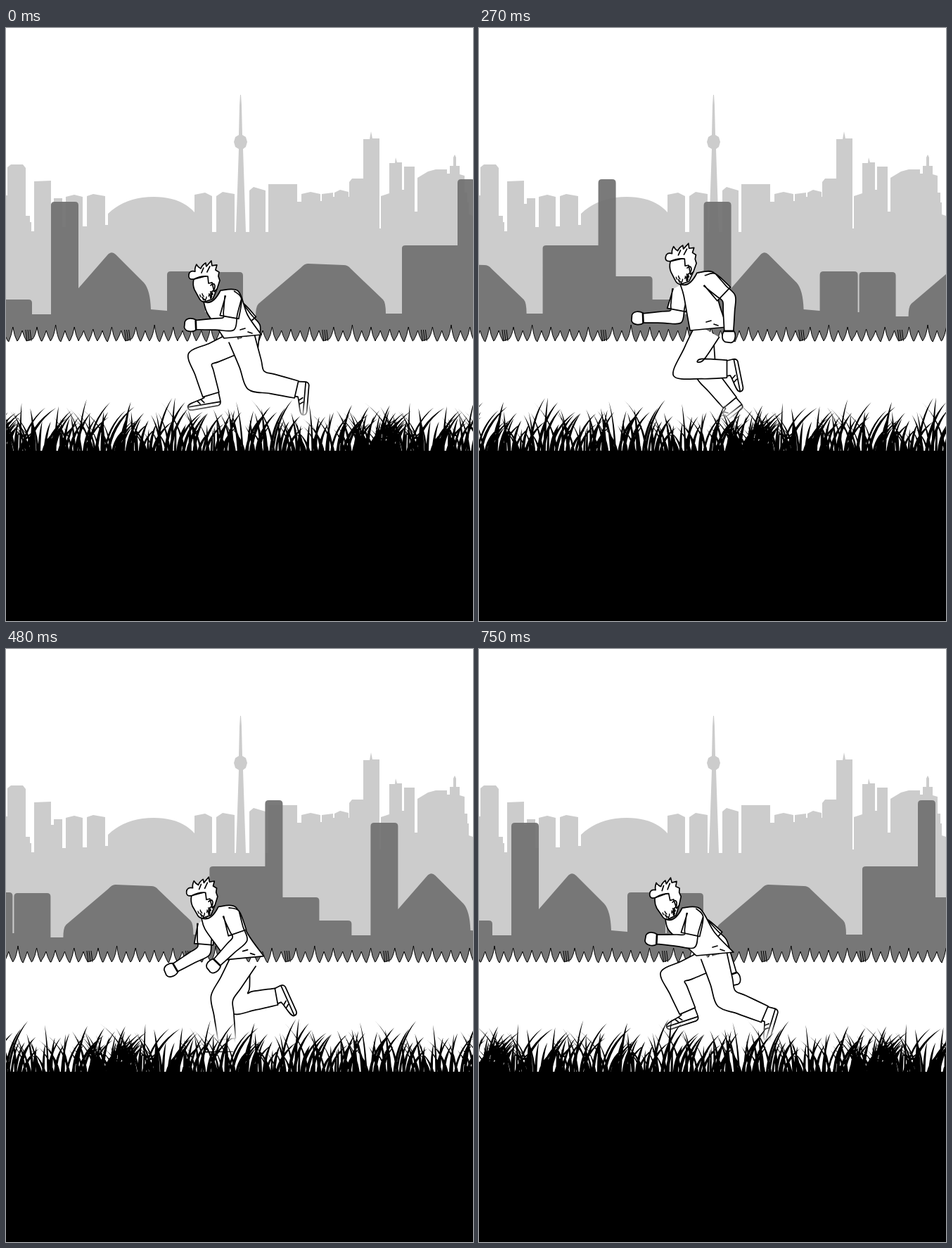
Recreate the animation shown at these times as an HTML page. Size 664 by 843 pixels, loop 780 ms.

```html
<!DOCTYPE html>
<html lang="en">
<head>
<meta charset="utf-8">
<title>Runner</title>
<style>
html, body { margin: 0; width: 100%; height: 100%; overflow: hidden; background: #fff; }
svg { display: block; width: 100%; height: 100%; }
.ink { fill: #fff; stroke: #000; stroke-width: 1.7; stroke-linejoin: round; stroke-linecap: round; }
.line { fill: none; }
</style>
</head>
<body>
<svg viewBox="0 0 664 843">
  <defs>
    <linearGradient id="fade" x1="0" y1="0" x2="0" y2="1">
      <stop offset="0" stop-color="#fff" stop-opacity="0"/>
      <stop offset=".7" stop-color="#fff"/>
    </linearGradient>
    <path id="town" d="M64 447V252Q64 247 69 247H98Q103 247 103 252V370L144 323Q150 316 156 322L196 362Q205 372 206 400L229 402V351Q229 346 234 346H278Q283 346 283 351V404H285V352Q285 347 290 347H332Q337 347 337 352V410H355Q355 396 359 392L419 341Q425 334 430 335L480 337Q486 337 490 342L536 386Q540 390 540 406H563V313Q563 309 568 309H642V220Q642 215 647 215H662Q667 215 667 220V353H714Q719 353 719 358V386H760Q765 386 765 391V407H793V447Z"/>
    <path id="blades"/>
  </defs>
  <path fill="#ccc" d="M0 447V238H2V198L7 194H24L28 199V267H34V276H36V289H40V218L64 217V250H68V242H80V283H85V240L97 237L109 240V282H115V239L124 236L141 239V280H145V264Q170 240 210 240Q248 240 268 262V237L283 234L293 239V290H299V239L308 233L325 236V290H327L331 172L326 169L324 162L326 155L331 152L332 110L333 95H334L335 110L336 152L341 155L343 162L341 169L337 172L341 290H346V231L352 226L369 231V290H373V222H414V247H420V236L433 233L447 236V246H449V236L465 234V240H467V234L475 230L487 233V240H488V219L492 214H508V158H517L519 147L521 157H531V285H533V239L545 235V192H553L554 184L556 191H563V230H566V197H581V261H585V213L600 204L611 201H627V207H631V196H636V184L638 180L640 184V196H645V208L652 210V234H656V248H658V265L664 267V447Z"/>
  <g id="mid" fill="#717171" opacity=".93"></g>
  <g id="hedge" stroke="#000">
    <path id="spikes" fill="#fff"/>
    <path id="stalks" fill="none"/>
  </g>
  <g class="ink">
    <path id="armB"/>
    <path id="shoeB" class="shoe"/><path id="legB"/>
    <path id="shoeA" class="shoe"/><path id="legA"/>
    <path id="torso"/>
    <g id="head">
      <path d="M-16-8Q-18 0-15 7L-9 18Q-6 25 0 24L11 20L17 6L8-14Z"/>
      <path d="M-16-8Q-24-7-23-14Q-22-21-14-19Q-15-23-12-29Q-10-25-6-23Q-4-28 1-31L2-26L9-34L10-27L17-28L15-21L20-18L19-12L21-6L17 6L13 10L10-3L5-2L4-12Q-6-13-16-8Z"/>
      <path class="line" d="M-2-24L-5-17M7-26L3-18M8 1Q13-4 14 2Q14 8 9 10"/>
      <path class="line" id="beard" stroke-width="1.4"/>
    </g>
    <path id="armA"/>
  </g>
  <rect y="532" width="664" height="40" fill="url(#fade)"/>
  <g id="lawn"></g>
  <rect y="601" width="664" height="242"/>
</svg>
<script>
const $ = id => document.getElementById(id);
const FRAME = 30, COUNT = 26, HALF = COUNT / 2;
const TOWN = 728, SPIKE = 140.6, LAWN = 552;

// Stride keys: step, upper angle, lower angle (degrees from straight down, + is backwards).
// Both sides of the body share them, half a cycle apart.
const legKeys = [[0, 19, 77], [4, -4, 108], [6.5, -20, 115], [9, -30, 90], [11, -64, 30],
  [14, -66, 10], [17, -12, 5], [20, -3, 22], [23, 11, 48]];
const armKeys = [[0, -10, -88], [4, -3, -50], [9, 46, 0], [12, 48, 20], [14, 36, -26], [19, -6, -72], [24, -14, -98]];
// Body keys: step, hip x, hip y, head x, head y
const bodyKeys = [[0, 335, 441, 283, 365], [4, 327, 432, 289, 342], [9, 325, 430, 288, 340],
  [14, 345, 448, 278, 366], [19, 329, 432, 283, 347], [23, 318, 426, 257, 351], [25, 334, 436, 267, 360]];

function sample(keys, step) {
  const p = step % COUNT;
  let i = keys.length - 1;
  while (keys[i][0] > p) i--;
  const a = keys[i], b = keys[(i + 1) % keys.length];
  const k = (p - a[0]) / ((b[0] || COUNT) - a[0]);
  return a.slice(1).map((v, j) => v + (b[j + 1] - v) * k);
}

const add = (a, b, k = 1) => [a[0] + b[0] * k, a[1] + b[1] * k];
const mix = (a, b, k = .5) => [a[0] + (b[0] - a[0]) * k, a[1] + (b[1] - a[1]) * k];
const rad = deg => deg * Math.PI / 180;
const along = deg => [Math.sin(rad(deg)), Math.cos(rad(deg))];
const front = deg => [-Math.cos(rad(deg)), Math.sin(rad(deg))];
const fmt = v => +v.toFixed(1);
const pt = p => p.map(fmt).join(" ");

// Smooth curve through the points, starting at the pen position
function curve(p) {
  let d = "";
  for (let i = 0; i < p.length - 1; i++) {
    const b = p[i], c = p[i + 1], a = p[i - 1] || b, e = p[i + 2] || c;
    d += `C${pt(add(b, add(c, a, -1), 1 / 6))} ${pt(add(c, add(e, b, -1), -1 / 6))} ${pt(c)}`;
  }
  return d;
}

const outline = (one, two) => `M${pt(one[0])}${curve(one)}L${pt(two[0])}${curve(two)}`;

// Two-bone limb: joints plus half-widths at root, bend and end
function limb(root, [up, low], [upLen, lowLen], [w0, w1, w2]) {
  const bend = add(root, along(up), upLen), end = add(bend, along(low), lowLen);
  const miter = Math.min(1.3, 1 / Math.cos(rad((low - up) / 2)));
  const edge = s => [
    add(root, front(up), s * w0),
    add(mix(root, bend, .6), front(up), s * (w0 + w1 * 2) / 3),
    add(bend, front((up + low) / 2), s * w1 * miter),
    add(mix(bend, end, .4), front(low), s * (w1 * 2 + w2) / 3),
    add(end, front(low), s * w2)
  ];
  const one = edge(1), two = edge(-1).reverse();
  return { bend, end, low, path: outline(one, two) };
}

function arm(shoulder, angles) {
  const a = limb(shoulder, angles, [38, 47], [12, 9, 6.5]);
  const up = angles[0], cuff = mix(shoulder, a.bend, .75);
  const at = (x, y) => pt(add(add(a.end, along(a.low), x), front(a.low), y));
  const hand = `M${at(-1, -7)}C${at(5, -11)} ${at(15, -9)} ${at(16, -3)}L${at(15, 5)}C${at(12, 11)} ${at(4, 10)} ${at(-1, 7)}Z`;
  const one = [add(shoulder, front(up), 11), add(cuff, front(up), 14)];
  const two = [add(cuff, front(up), -13), add(shoulder, front(up), -12), add(shoulder, along(up), -9)];
  return a.path + hand + outline(one, two);
}

function shirt(hip, head) {
  const neck = add(head, [-2, 24]), nape = add(head, [22, 8]);
  const chest = add(head, [3, 40]), back = add(head, [47, 9]);
  const hemF = add(hip, [-25, 0]), hemB = add(hip, [28, -5]);
  const one = [neck, chest, mix(chest, hemF, .6), hemF];
  const two = [hemB, add(mix(hemB, back), [-3, 3]), back, nape];
  return outline(one, two) + `Q${pt(add(mix(neck, nape), [1, 14]))} ${pt(neck)}Z` +
    `M${pt(add(hip, [-2, -12]))}l7 -2M${pt(add(hip, [9, -9]))}l6 2`;
}

function leg(side, hip, angles, lengths, widths) {
  const l = limb(hip, angles, lengths, widths);
  const tilt = -1.25 * Math.max(0, l.low - 10);
  $("leg" + side).setAttribute("d", l.path);
  $("shoe" + side).setAttribute("transform", `translate(${pt(l.end)}) rotate(${fmt(tilt)})`);
}

let seed = 11;
const rnd = () => (seed = seed * 16807 % 2147483647) / 2147483647;

function blade(x, h, lean, w) {
  const bend = 606 - h * .65, cx = x + lean * .15;
  return `M${pt([x - w, 606])}Q${pt([cx - w, bend])} ${pt([x + lean, 606 - h])}Q${pt([cx + w, bend + 3])} ${pt([x + w, 606])}Z`;
}

function growLawn() {
  let d = "";
  for (let i = 0; i < 190; i++) {
    const h = rnd() < .1 ? 68 + rnd() * 13 : 34 + rnd() * 34;
    d += blade(i * LAWN / 190 + rnd() * 3, h, (rnd() - .5) * h * 1.3, 1.3 + rnd());
  }
  // A thicker clump
  for (let i = 0; i < 45; i++) {
    const h = 32 + rnd() * 34;
    d += blade(540 + (rnd() + rnd() - 1) * 55, h, (rnd() - .5) * h * 1.7, 1.9);
  }
  $("blades").setAttribute("d", d);
}

function growSpikes() {
  let d = `M${-2 * SPIKE} 640V444`, stalks = "";
  for (let k = -2; k < 6; k++) {
    const o = k * SPIKE;
    for (let i = 0; i < 10; i++) {
      const x = o + 12 + 13.3 * i, y = i % 2 ? 430 : 425 - 3 * Math.sin(i * Math.PI / 4);
      d += `L${fmt(x - 6)} ${442 + i * 3 % 5}Q${pt([x - 2, 437])} ${pt([x, y])}Q${pt([x + 2, 438])} ${pt([x + 6, 445])}`;
    }
    for (const x of [-3, 0, 3]) stalks += `M${fmt(o + x - 1)} 429L${fmt(o + x + 1)} 445`;
  }
  $("spikes").setAttribute("d", d + "V640Z");
  $("stalks").setAttribute("d", stalks);
}

function growBeard() {
  let d = "";
  for (let i = 0; i < 20; i++) {
    const x = -8 + rnd() * 20, y = 11 + rnd() * 10 - x * .25;
    d += `M${pt([x, y])}l${pt([rnd() * 3 - 1, 2 + rnd() * 2])}`;
  }
  $("beard").setAttribute("d", d);
}

const copies = (id, size, count) =>
  Array.from({ length: count }, (_, k) => `<use href="#${id}" x="${(k - 2) * size}"/>`).join("");

growLawn();
growSpikes();
growBeard();
$("mid").innerHTML = copies("town", TOWN, 3);
$("lawn").innerHTML = copies("blades", LAWN, 4);
document.querySelectorAll(".shoe").forEach(s => s.setAttribute("d",
  "M-10-4L-10 3C-19 7-35 7-35 13Q-35 18-29 18L8 17Q13 16 12 9L11-4ZM-34 13L11 12M-15 5L-11 10M-20 7L-17 11"));

const slide = (id, x) => $(id).setAttribute("transform", `translate(${fmt(x)} 0)`);

function draw(n) {
  slide("mid", 28.4 * n % TOWN);
  slide("hedge", (32 + 31.8 * n) % SPIKE);
  slide("lawn", 45.5 * n % LAWN);

  const [hx, hy, x, y] = sample(bodyKeys, n), hip = [hx, hy], head = [x, y];
  leg("A", hip, sample(legKeys, n), [63, 59], [19, 15, 12.5]);
  leg("B", add(hip, [-8, 6]), sample(legKeys, n + HALF), [56, 53], [16, 14, 12]);
  $("torso").setAttribute("d", shirt(hip, head));

  // The far shoulder swings with its arm
  const far = sample(armKeys, n + HALF);
  $("armA").setAttribute("d", arm(add(head, [40, 18]), sample(armKeys, n)));
  $("armB").setAttribute("d", arm(add(head, [8 + far[0] * .85, 33]), far));
  $("head").setAttribute("transform", `translate(${pt(head)}) rotate(${fmt((x - 284) * .35)})`);
}

let start = null;
function tick(now) {
  if (start === null) start = now;
  draw(Math.floor((now - start) / FRAME) % COUNT);
  requestAnimationFrame(tick);
}
draw(0);
requestAnimationFrame(tick);
</script>
</body>
</html>
```
